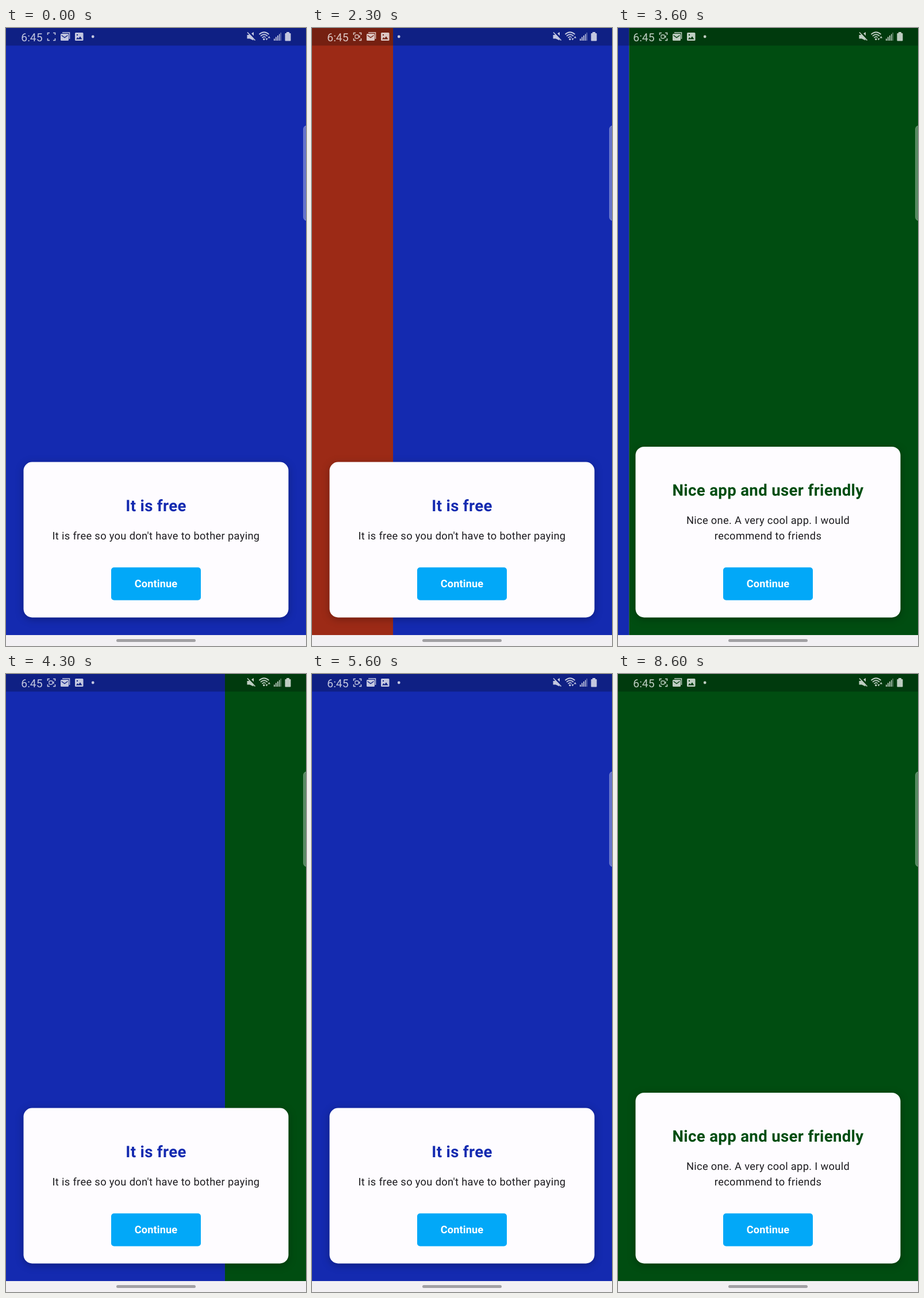
Recreate the animation shown at these times as an HTML page. Size 522 by 1073 pixels, loop 8.7 s.

```html
<!DOCTYPE html>
<html lang="en">
<head>
<meta charset="utf-8">
<title>Onboarding pages</title>
<style>
  html, body { margin: 0; width: 100%; height: 100%; overflow: hidden; }
  svg { display: block; width: 522px; height: 1073px; }
  text { font-family: Roboto, sans-serif; text-rendering: geometricPrecision; }
  #card { filter: drop-shadow(0 3px 7px rgba(0, 0, 0, .28)); }
  .centred { text-anchor: middle; letter-spacing: .33px; }
  .title { font-size: 27.6px; font-weight: 700; }
  .body { font-size: 18.3px; fill: #1c1b1f; }
  .button { font-size: 18.2px; font-weight: 700; fill: #fff; letter-spacing: .13px; }
  .line { fill: none; stroke: #fff; }
</style>
</head>
<body>
<svg viewBox="0 0 522 1073">
  <g id="pages"></g>
  <rect width="522" height="30.5" fill="#000" opacity=".25"/>

  <g id="status" fill="#fff" opacity=".75">
    <text x="26.3" y="22.5" font-size="19.3">6:45</text>
    <path class="line" stroke-width="1.6" d="M72.5 12V8.5H76M82 8.5H85.5V12M85.5 18V21.5H82M76 21.5H72.5V18"/>
    <g id="recording">
      <rect class="line" x="75" y="12" width="6" height="6" rx="1.5" stroke-width="1.3"/>
      <path d="M81 14.5L83.5 12.5V17.5L81 15.5Z"/>
    </g>
    <path class="line" stroke-width="1.5" d="M98 8H110.5V19"/>
    <path fill-rule="evenodd" d="M96 10H107.500Q109 10 109 11.500V20.500Q109 22 107.500 22H96.500Q95 22 95 20.500V11.500Q95 10 96.500 10ZM96.500 12V13.500L102 17.500L107.500 13.500V12L102 15.800Z"/>
    <path fill-rule="evenodd" d="M121.500 8H133Q134.500 8 134.500 9.500V20.500Q134.500 22 133 22H121.500Q120 22 120 20.500V9.500Q120 8 121.500 8ZM122 19.500H132.500L129 14.500L126.300 18L124.500 16ZM123 11V13H125V11Z"/>
    <circle cx="151.200" cy="15" r="2.400"/>
    <path d="M419.500 12H422.500L424 10.700L430.500 17.500V21.500L424 18.500H419.500ZM427 9.500L431 7V13.500Z"/>
    <path class="line" stroke-width="1.600" d="M420 7.500L433.500 21.500"/>
    <path class="line" stroke-width="1.700" d="M440.500 11Q449 3.500 457.500 11M443 14Q449 8.500 455 14M445.500 17Q449 13.500 452 16.500"/>
    <circle cx="448.800" cy="19.500" r="1.700"/>
    <path d="M451.500 18H455.500L453.500 21.500ZM455.500 17.500H460L457.800 14Z"/>
    <path d="M466 18.500h1.800V22h-1.800ZM469 15.500h1.800V22h-1.800ZM472 13h1.800V22h-1.800ZM475 10.500h1.500V22h-1.500Z"/>
    <path opacity=".5" d="M477.500 8h1.500V22h-1.500Z"/>
    <path d="M488 7H493V9H494.500Q495.500 9 495.500 10V21.500Q495.500 22.500 494.500 22.500H486.500Q485.500 22.500 485.500 21.500V10Q485.500 9 486.500 9H488Z"/>
  </g>

  <rect x="517.500" y="169.500" width="20" height="165" rx="6" fill="#fff" fill-opacity=".34" stroke="#fff" stroke-opacity=".25"/>

  <rect id="card" x="30.500" width="461" rx="15" fill="#fefcff"/>
  <text id="title" class="centred title" x="261"></text>
  <text id="upper" class="centred body" x="261" y="861.400"></text>
  <text id="lower" class="centred body" x="261" y="888"></text>
  <rect x="183" y="936.500" width="156" height="57" rx="5" fill="#02a8f8"/>
  <text class="centred button" x="261" y="971">Continue</text>

  <rect y="1054" width="522" height="19" fill="#f2f0f3"/>
  <rect x="192" y="1061" width="138" height="5" rx="2.500" fill="#a2a1a4"/>
</svg>
<script>
const WIDTH = 522, LOOP = 8700, STEP = 100, LINE = 26.6, CARD_BOTTOM = 1023.5;

const pages = [
  { color: '#9c2a16', title: 'Perform cool tasks', lines: ['Perform cool tasks is easy with this app'] },
  { color: '#142ab0', title: 'It is free', lines: ["It is free so you don't have to bother paying"] },
  { color: '#004d11', title: 'Nice app and user friendly',
    lines: ['Nice one. A very cool app. I would', 'recommend to friends'] },
];

// Swipes: start time, duration, page reached
const START_PAGE = 1;
const swipes = [
  [300, 580, 0], [2000, 600, 1], [3180, 550, 2], [4000, 600, 1],
  [4600, 440, 0], [5050, 520, 1], [8130, 470, 2],
];

const $ = id => document.getElementById(id);

$('pages').innerHTML = pages.map((page, i) =>
  `<rect x="${i * WIDTH}" width="${WIDTH}" height="1073" fill="${page.color}"/>`).join('');

// Short drag, then a springy settle
const swipeEase = u => 1 - (1 - u ** 1.5) ** 3;

function scrollAt(time) {
  let position = START_PAGE;
  for (const [start, duration, page] of swipes) {
    const u = Math.min(1, Math.max(0, (time - start) / duration));
    position += (page - position) * swipeEase(u);
  }
  return position;
}

function showCard(index) {
  const { color, title, lines } = pages[index];
  const rise = (lines.length - 1) * LINE;
  const height = 270 + rise;
  $('card').setAttribute('y', CARD_BOTTOM - height);
  $('card').setAttribute('height', height);
  $('title').setAttribute('y', 838.7 - rise);
  $('title').setAttribute('fill', color);
  $('title').textContent = title;
  $('upper').textContent = lines.length > 1 ? lines[0] : '';
  $('lower').textContent = lines[lines.length - 1];
}

let shown = -1;
function draw(now) {
  const time = Math.floor(now % LOOP / STEP) * STEP;
  const position = scrollAt(time);
  const index = Math.round(position);
  $('pages').setAttribute('transform', `translate(${-position * WIDTH})`);
  if (index !== shown) showCard(shown = index);
  const phase = time % 1000;
  $('recording').style.display = phase > 150 && phase < 650 ? '' : 'none';
}

let origin;
function tick(now) {
  origin ??= now;
  draw(now - origin);
  requestAnimationFrame(tick);
}
draw(0);
requestAnimationFrame(tick);
</script>
</body>
</html>
```
